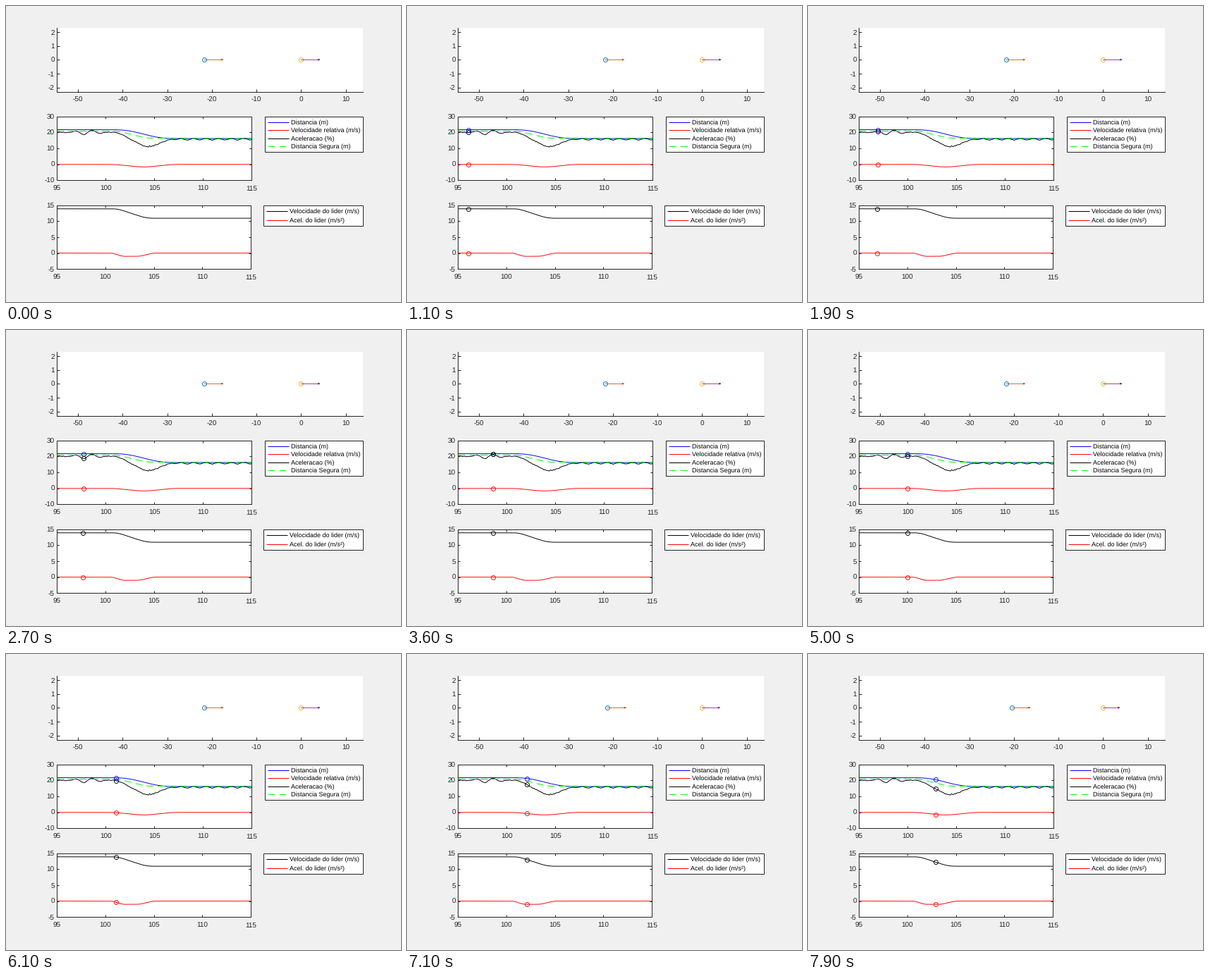
Animation, 560 px wide and 420 px high, one loop 8 s. Source, as a matplotlib script:

```python
import matplotlib.pyplot as plt
import numpy as np
from matplotlib.animation import FuncAnimation
from matplotlib.patches import Rectangle

W, H, DPI = 560, 420, 72  # at 72 dpi one point is one pixel
FRAMES, INTERVAL = 80, 100
INK = "#262626"
BLUE, RED, BLACK, GREEN = "#0000ff", "#ff0000", "#000000", "#00ff00"
DASH = (0, (10, 6))

plt.rcParams.update({
    "font.family": "Liberation Sans",
    "axes.unicode_minus": False,
    "text.hinting": "none",
    "axes.linewidth": 1,
    "axes.edgecolor": INK,
})

# ---- signals ----
STEP = 0.02
t = np.arange(95, 115 + STEP / 2, STEP)


def ease(start, end):
    u = np.clip((t - start) / (end - start), 0, 1)
    return u * u * (3 - 2 * u)


def bell(center, width):
    return np.exp(-((t - center) / width) ** 2)


def wave(peak, period):
    return np.cos(2 * np.pi * (t - peak) / period)


def integral(start, rate):
    return start + np.concatenate([[0], np.cumsum((rate[1:] + rate[:-1]) / 2 * STEP)])


def jitter(spacing=0.14):
    knots = np.arange(95, 115 + 2 * spacing, spacing)
    return np.interp(t, knots, np.random.default_rng(7).uniform(-1, 1, knots.size))


# The leader brakes; the follower reacts and settles at the new safe distance.
lead_acc = ease(103.2, 105.2) - ease(100.5, 102)
lead_vel = integral(13.88, lead_acc)
rel_vel = 1.58 * (ease(103.9, 107.4) - ease(100.4, 103.9))
dist = integral(21.74, rel_vel)
safe = 1.5 * lead_vel
throttle = (20.1 - 8.9 * ease(100.7, 104.5) + 4.6 * ease(104.4, 107)
            + 1.5 * bell(98, 1.4) * wave(98.6, 1.8)
            + 0.5 * ease(106, 108) * wave(109, 1.3)
            + (0.2 + 0.25 * bell(104.2, 1.5)) * jitter())

# ---- stage ----
fig = plt.figure(figsize=(W / DPI, H / DPI), dpi=DPI, facecolor="#f0f0f0")


def panel(top, right, xlim, ylim, xstep, ystep, box=True):
    left, height = 72.3, 90.6
    ax = fig.add_axes([left / W, 1 - (top + height) / H, (right - left) / W, height / H])
    ax.set(xlim=xlim, ylim=ylim,
           xticks=np.arange(np.ceil(xlim[0] / xstep) * xstep, xlim[1] + 0.1, xstep),
           yticks=np.arange(np.ceil(ylim[0] / ystep) * ystep, ylim[1] + 0.1, ystep))
    ax.xaxis.set_major_formatter("{x:.0f}")
    ax.yaxis.set_major_formatter("{x:.0f}")
    ax.tick_params(direction="in", length=(right - left) / 100, width=1, color=INK,
                   labelcolor=INK, labelsize=10, top=box, right=box)
    ax.tick_params(axis="x", pad=7.5)
    ax.tick_params(axis="y", pad=3.5)
    ax.spines[["top", "right"]].set_visible(box)
    return ax


road = panel(31, 506.3, (-54.7, 13.9), (-2.3, 2.3), 10, 1, box=False)
gap = panel(156.8, 348.1, (95, 115), (-10, 30), 5, 10)
lead = panel(282.7, 347.1, (95, 115), (-5, 15), 5, 5)

page = fig.add_axes([0, 0, 1, 1])
page.set(xlim=(0, W), ylim=(H, 0))
page.axis("off")


def legend(left, top, height, pitch, rows):
    page.add_patch(Rectangle((left, top), 506 - left, height,
                             fc="white", ec=INK, lw=1))
    for i, (color, style, label) in enumerate(rows):
        y = top + 8 + pitch * i
        page.plot([left + 4, left + 33.5], [y, y], color=color, ls=style, lw=1,
                  solid_capstyle="butt")
        page.text(left + 37, y + 3.2, label, size=9, color="black")


legend(367, 157, 49.5, 11.4, [
    (BLUE, "-", "Distancia (m)"),
    (RED, "-", "Velocidade relativa (m/s)"),
    (BLACK, "-", "Aceleracao (%)"),
    (GREEN, DASH, "Distancia Segura (m)"),
])
legend(365, 283, 28.5, 13.4, [
    (BLACK, "-", "Velocidade do lider (m/s)"),
    (RED, "-", "Acel. do lider (m/s\u00b2)"),
])


def ring(ax, color, **style):
    return ax.plot([], [], "o", ms=6, mfc="none", mec=color, mew=0.9, **style)[0]


gap.plot(t, safe, color=GREEN, ls=DASH, lw=1, zorder=3)
dots = []
for ax, y, color in [(gap, dist, BLUE), (gap, rel_vel, RED), (gap, throttle, BLACK),
                     (lead, lead_vel, BLACK), (lead, lead_acc, RED)]:
    ax.plot(t, y, color=color, lw=0.95)
    dots.append((ring(ax, color, clip_on=False, zorder=5), y))


def car(ring_color, arrow_color):
    return ring(road, ring_color), road.plot([], [], color=arrow_color, lw=0.9)[0]


follower = car("#0072bd", "#d95319")
leader = car("#edb120", "#7e2f8e")


def place(parts, x, speed):
    body, arrow = parts
    tip = x + 0.3 * speed
    back = tip - 0.3
    body.set_data([x], [0])
    arrow.set_data([x, tip, back, tip, back], [0, 0, 0.04, 0, -0.04])


def draw(frame):
    now = 95 + frame * INTERVAL / 1000

    def at(y):
        return np.interp(now, t, y)

    for dot, y in dots:
        dot.set_data([now], [at(y)])
        dot.set_visible(frame > 0)
    place(follower, -at(dist), at(lead_vel) - at(rel_vel))
    place(leader, 0, at(lead_vel))
    return []


anim = FuncAnimation(fig, draw, frames=FRAMES, interval=INTERVAL, repeat=True,
                     repeat_delay=0)
plt.show()
```
